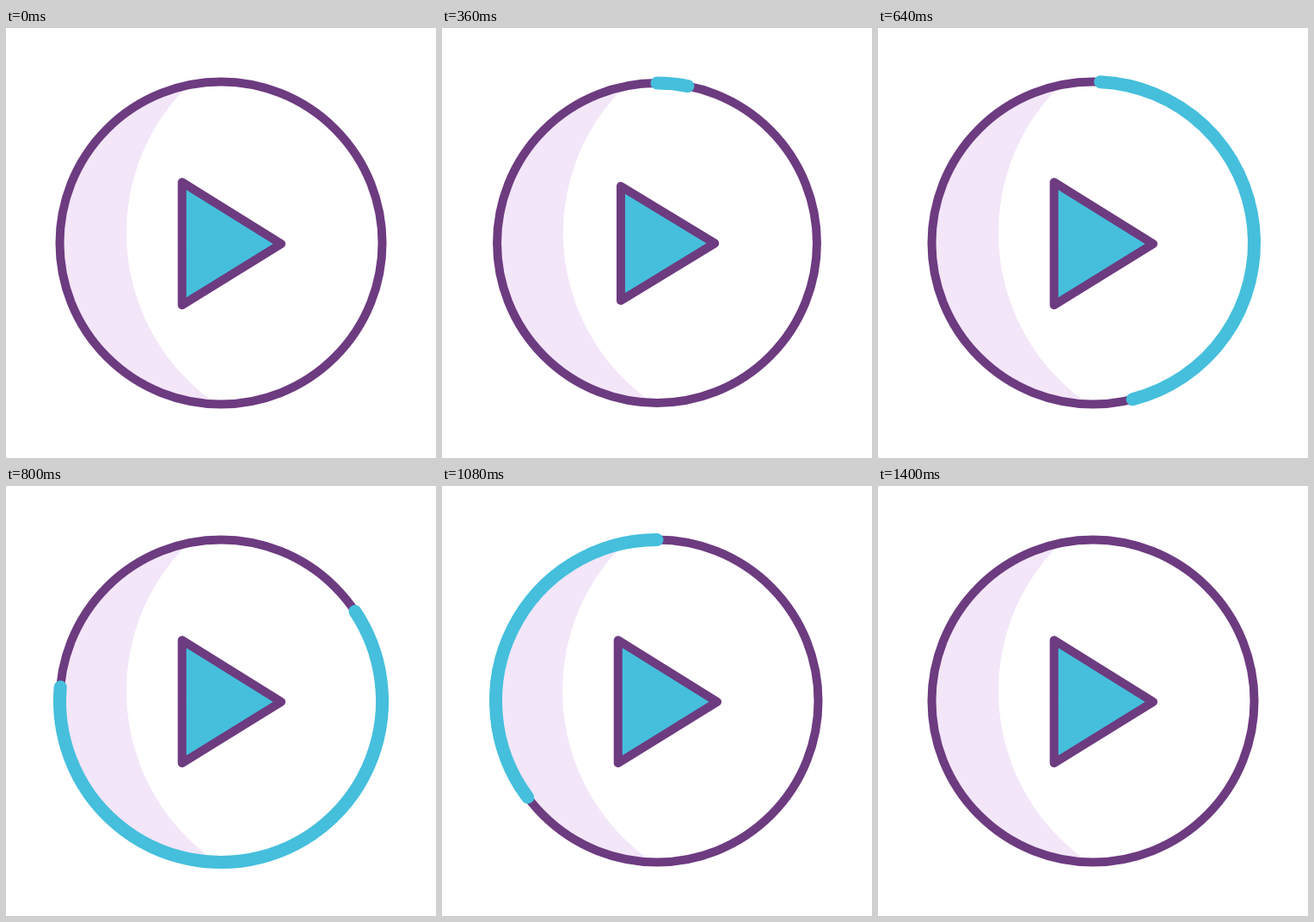
Animation, 500 px wide and 500 px high, one loop 1480 ms. Source, as an HTML page:

```html
<!DOCTYPE html>
<html lang="en">
<head>
<meta charset="utf-8">
<title>Play button</title>
<style>
  html, body { margin: 0; width: 100%; height: 100%; overflow: hidden; background: #fff; }
  svg { display: block; width: 100%; height: 100%; }
</style>
</head>
<body>
<svg viewBox="0 0 500 500">
  <g id="face">
    <circle r="187.5" fill="#f2e6f8"/>
    <circle cx="131" cy="-11.7" r="241" fill="#fff"/>
  </g>
  <g fill="none" stroke="#6d3b80" stroke-width="10" stroke-linejoin="round">
    <circle id="ring" cx="250" cy="250"/>
    <path id="play" fill="#45bfdc"/>
  </g>
  <path id="arc" fill="none" stroke="#45bfdc" stroke-width="15" stroke-linecap="round"/>
</svg>
<script>
const LOOP = 1480, STEP = 40, RADIUS = 187.5;
const [face, ring, play, arc] = ['face', 'ring', 'play', 'arc'].map(id => document.getElementById(id));

// Resting corners of the triangle and their shift when fully pressed
const corners = [[204.7, 179.3], [204.7, 322.2], [320, 251]];
const shifts = [[12.4, 17.8], [12.4, -20.1], [-10.7, -2.4]];

function ease(t, from, to) {
  const x = Math.min(1, Math.max(0, (t - from) / (to - from)));
  return x * x * (3 - 2 * x);
}

// Point on the ring, clockwise from the top
function onRing(turn, r) {
  const a = turn * 2 * Math.PI;
  return `${250 + r * Math.sin(a)} ${250 - r * Math.cos(a)}`;
}

function draw(t) {
  const press = ease(t, 120, 280) - ease(t, 280, 400);
  const r = RADIUS - 6 * press;
  ring.setAttribute('r', r);
  face.setAttribute('transform', `translate(250 250) scale(${r / RADIUS})`);

  const points = corners.map(([x, y], i) =>
    `${x + shifts[i][0] * press} ${y + shifts[i][1] * press}`);
  play.setAttribute('d', `M${points.join('L')}Z`);

  const head = ease(t, 280, 1040);
  const tail = ease(t, 600, 1400);
  const large = head - tail > 0.5 ? 1 : 0;
  arc.setAttribute('d', head > tail
    ? `M${onRing(tail, r)}A${r} ${r} 0 ${large} 1 ${onRing(head, r)}`
    : '');
}

const start = performance.now();
function tick() {
  const t = (performance.now() - start) % LOOP;
  draw(Math.floor(t / STEP) * STEP);
  requestAnimationFrame(tick);
}
tick();
</script>
</body>
</html>
```
